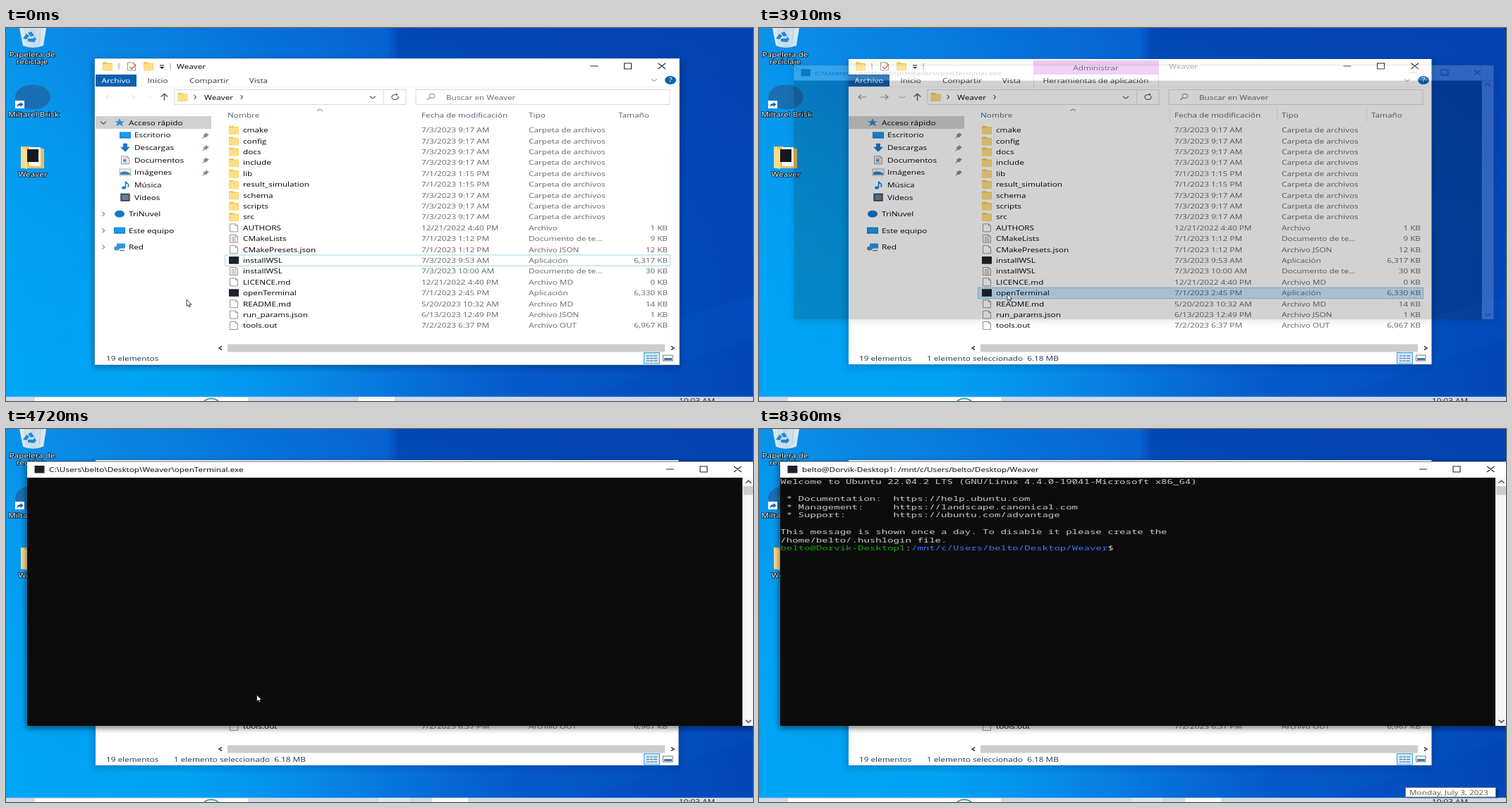
These frames come from a looping animation (1059 by 529 pixels, 8460 ms). An HTML page:

```html
<!DOCTYPE html>
<html lang="es">
<head>
<meta charset="utf-8">
<title>Weaver</title>
<style>
html, body { margin: 0; width: 100%; height: 100%; overflow: hidden; background: #0a6fd8; }
svg { display: block; width: 1059px; height: 529px; }
text { font: 11.15px "Open Sans", "Noto Sans", sans-serif; white-space: pre; }
.mono text { font: 13.33px "Noto Sans Mono", "DejaVu Sans Mono", monospace; fill: #ccc; }
.label text { fill: #fff; text-anchor: middle; stroke: #000b; stroke-width: 2px; paint-order: stroke; }
.line { fill: none; stroke: #333; stroke-width: 1.2; }
</style>
</head>
<body>
<svg id="stage" viewBox="0 0 1059 529"></svg>
<script>
const LOOP = 8460;
const USER = 'belto', HOST = 'Dorvik-Desktop1';
const HOME = `/mnt/c/Users/${USER}/Desktop/Weaver`;

// The desktop is shown squeezed: every text shares this one scale.
const txt = (x, y, s, attrs = '') =>
  `<text transform="translate(${x} ${y}) scale(1.055 .734)" ${attrs}>${s}</text>`;
const mid = 'text-anchor="middle"';
const box = (x, y, w, h, fill, attrs = '') =>
  `<rect x="${x}" y="${y}" width="${w}" height="${h}" fill="${fill}" ${attrs}/>`;
const path = (d, attrs = '') => `<path d="${d}" ${attrs}/>`;
const line = (d, color = '#333', w = 1.2) =>
  path(d, `class="line" style="stroke:${color};stroke-width:${w}"`);
const group = (id, body, attrs = '') => `<g id="${id}" ${attrs}>${body}</g>`;
const ellipse = (x, y, rx, ry, fill, attrs = '') =>
  `<ellipse cx="${x}" cy="${y}" rx="${rx}" ry="${ry}" fill="${fill}" ${attrs}/>`;
const gradient = (id, stops, attrs = '') => `<linearGradient id="${id}" ${attrs}>` +
  stops.map(([o, c]) => `<stop offset="${o}" stop-color="${c}"/>`).join('') + '</linearGradient>';

const folder = (x, y) =>
  path(`M${x} ${y + 1}q0-1 1-1h5l1.5 1.5h5.5q1 0 1 1v8.5q0 1-1 1h-12q-1 0-1-1z`, 'fill="#f3c84f"') +
  box(x + .5, y + 2.5, 13, 9, '#ffdf85');
const app = (x, y) => box(x + 1, y, 14, 10.5, '#1c222b');
const page = (x, y, ruled) =>
  path(`M${x} ${y}h8l3 2.5v8.5h-11z`, 'fill="#fff" stroke="#8a8a8a" stroke-width=".9"') +
  line(`M${x + 8} ${y}v2.5h3`, '#8a8a8a', .8) +
  (ruled ? line(`M${x + 2} ${y + 3}h5m-5 2h7m-7 2h7m-7 2h7`, '#8a8f96', .8) : '');
const winButtons = (x, y, color) =>
  line(`M${x} ${y}h11M${x + 48} ${y - 4}h10v8h-10zM${x + 96} ${y - 4}l10.5 8m0-8l-10.5 8`, color, 1.1);
const chevron = (x, y, dx, dy, color, w) => dx
  ? line(`M${x - dx} ${y - 3}l${dx * 2} 3l${-dx * 2} 3`, color, w)
  : line(`M${x - 4} ${y - dy}l4 ${dy * 2}l4 ${-dy * 2}`, color, w);

const defs = `<defs>
  ${gradient('low', [[0, '#00a6f6'], [.25, '#00a2f4'], [.4, '#068ce9'], [.52, '#0874dd'], [.7, '#0557c8'], [1, '#0347b8']])}
  ${gradient('high', [[0, '#0a92ea'], [.1, '#0a88e4'], [.3, '#0874dc'], [.51, '#0761d0'], [.525, '#0348b4'], [1, '#0342b0']])}
  ${gradient('down', [[0, '#fff'], [.55, '#333'], [.9, '#000']], 'x2="0" y2="1"')}
  ${gradient('bin', [[0, '#f5f8fa'], [.5, '#d3dde5'], [1, '#f0f4f7']])}
  <mask id="fade">${box(0, 0, 1059, 529, 'url(#down)')}</mask>
  <filter id="shadow" x="-5%" y="-10%" width="110%" height="120%"><feGaussianBlur stdDeviation="5"/></filter>
</defs>`;

const wallpaper = box(0, 0, 1059, 529, 'url(#low)') +
  box(0, 0, 1059, 529, 'url(#high)', 'mask="url(#fade)"') +
  path('M560 529L720 478L1059 380V440L800 529z', 'fill="#0a63d2" opacity=".12"');

const desktop = path('M18-6H58L53 25Q38 31 24 25z', 'fill="url(#bin)" opacity=".93"') +
  line('M27 0l2 22M49 0l-2 22', '#b4c2cd', .8) +
  path('M29 16l-5-1l5-7l4 3zM31 7l5-2l4 6l-5 1zM31 19v-4h8l1-3l3 4l-3 4z', 'fill="#2387d6"') +
  ellipse(38, 98, 25, 17.6, '#1a6fb4') +
  box(13, 103, 13, 11, '#fff') + path('M15.5 112q0-5 5-5v-2l4 3.5l-4 3.5v-2q-3-.5-5 2z', 'fill="#1d66b5"') +
  path('M21 168h13l4 3h16v28h-33z', 'fill="#e9bf62"') +
  path('M33 169h16v27H33z', 'fill="#f7f7f7"') +
  box(28, 172, 18, 18, '#15191f') +
  path('M21 168l9 4v28l-9-2z', 'fill="#fbdc92"') +
  `<g class="label">${txt(37, 40.5, 'Papelera de')}${txt(37, 51.3, 'reciclaje')}
   ${txt(39, 126, 'Miltarel Brisk')}${txt(38, 210.5, 'Weaver')}</g>`;

const taskbar = box(0, 523, 1059, 6, '#d0dcea') + box(41, 523.5, 302, 6, '#fff') +
  line('M0 523.3H1059', '#b9cbdc', .7) +
  ellipse(291, 534, 12, 8.5, 'none', 'stroke="#35a3b4" stroke-width="2"') +
  group('taskA', box(500, 523, 51, 6, '#f7fafd')) +
  group('taskB', box(528, 523, 44, 6, '#dfe8f2') + box(604, 523, 51, 6, '#f7fafd')) +
  txt(954, 532, '10:03 AM', 'fill="#222"');

const DIR = 'Carpeta de archivos', TXT = 'Documento de te...';
const files = [
  ['cmake', '7/3/2023 9:17 AM', DIR], ['config', '7/3/2023 9:17 AM', DIR],
  ['docs', '7/3/2023 9:17 AM', DIR], ['include', '7/3/2023 9:17 AM', DIR],
  ['lib', '7/1/2023 1:15 PM', DIR], ['result_simulation', '7/1/2023 1:15 PM', DIR],
  ['schema', '7/3/2023 9:17 AM', DIR], ['scripts', '7/3/2023 9:17 AM', DIR],
  ['src', '7/3/2023 9:17 AM', DIR],
  ['AUTHORS', '12/21/2022 4:40 PM', 'Archivo', '1 KB'],
  ['CMakeLists', '7/1/2023 1:12 PM', TXT, '9 KB'],
  ['CMakePresets.json', '7/1/2023 1:12 PM', 'Archivo JSON', '12 KB'],
  ['installWSL', '7/3/2023 9:53 AM', 'Aplicación', '6,317 KB'],
  ['installWSL', '7/3/2023 10:00 AM', TXT, '30 KB'],
  ['LICENCE.md', '12/21/2022 4:40 PM', 'Archivo MD', '0 KB'],
  ['openTerminal', '7/1/2023 2:45 PM', 'Aplicación', '6,330 KB'],
  ['README.md', '5/20/2023 10:32 AM', 'Archivo MD', '14 KB'],
  ['run_params.json', '6/13/2023 12:49 PM', 'Archivo JSON', '1 KB'],
  ['tools.out', '7/2/2023 6:37 PM', 'Archivo OUT', '6,967 KB']
];
const fileRow = ([name, date, type, size = ''], i) => {
  const y = 144.8 + i * 15.4, b = y + 3.3, grey = 'fill="#666"';
  const icon = type === DIR ? folder(316, y - 6)
    : type === 'Aplicación' ? app(315, y - 5.5) : page(317.5, y - 5.5, type === TXT);
  return icon + txt(336, b, name, 'fill="#000"') + txt(589, b, date, grey) +
    txt(741, b, type, grey) + txt(938, b, size, grey + ' text-anchor="end"');
};

// Icons of the side pane, drawn around their own centre.
const icons = {
  star: path('M0-6l2 4h5l-4 2.5l2 4.5l-5-2.5l-5 2.5l2-4.5l-4-2.5h5z', 'fill="#2a8fdd"'),
  screen: box(-8, -4.5, 16, 9, '#0f7fd0') + box(-7, -3.5, 14, 6, '#1d9bec'),
  down: path('M-3-6h6v5h4l-7 7l-7-7h4z', 'fill="#1f77cf"'),
  doc: page(-5.5, -5.5, true) + box(-3, -1, 4, 3, '#4a94d0'),
  image: box(-8, -5, 16, 9, '#f5f8fa', 'stroke="#8c9aa6" stroke-width=".8"') + path('M-7 3v-3q6-4 14 1v2z', 'fill="#3c7fb8"'),
  note: ellipse(-2, 4, 3, 2, '#1483dd') + line('M.5 4v-9q1 3 4 4q1 2-1 4', '#1483dd', 1.6),
  film: box(-7, -5.5, 14, 11, '#2f3338') + box(-4.5, -4, 9, 8, '#5e83a8') + line('M-6-5v10M6-5v10', '#bbb', .8),
  dot: ellipse(0, 0, 7, 5, '#1277cc'),
  net: box(-4, -5, 12, 7, '#2696e6') + ellipse(-4, 2, 4, 3, '#4b8fc6') + line('M0 5h7', '#4a6a85')
};
const pin = y => path(`M283 ${y - 4}l5 3.5l-1.5 .5l-2 3l-2.500-.3l-4.500 2.800l3-4l-.5-2.500l3.500-1.500z`, 'fill="#84909a"');
const pane = [
  [134.2, 174, 'Acceso rápido', 'star'], [152, 182, 'Escritorio', 'screen', 1],
  [169.7, 182, 'Descargas', 'down', 1], [187.3, 182, 'Documentos', 'doc', 1],
  [205, 182, 'Imágenes', 'image', 1], [222.6, 182, 'Música', 'note'],
  [240.2, 182, 'Vídeos', 'film'], [263.7, 174, 'TriNuvel', 'dot'],
  [287.2, 174, 'Este equipo', 'screen'], [310.6, 174, 'Red', 'net']
];
const paneRow = ([y, x, name, icon, pinned]) =>
  `<g transform="translate(${x === 182 ? 169 : 161} ${y})">${icons[icon]}</g>` +
  txt(x, y + 3.4, name, 'fill="#000"') + (pinned ? pin(y) : '');

const tabs = [[156, 'Archivo', '#fff'], [215, 'Inicio', '#333'], [288, 'Compartir', '#333'], [358, 'Vista', '#333']];
const heads = [[314, 'Nombre'], [589, 'Fecha de modificación'], [741, 'Tipo'], [868, 'Tamaño']];

const explorer =
  group('exShadow', box(124, 46, 833, 435, '#00204a', 'filter="url(#shadow)"')) +
  group('exFrame', box(125.5, 43, 829.5, 435, '#fff', 'stroke="#1e5c9c" stroke-opacity=".6"')) +
  box(127, 44, 826.5, 433, '#fff') +
  folder(137, 48.5) + line('M160 50v9M233 50v9', '#888', .9) +
  page(172.5, 49) + line('M175 55l3 3l6-6', '#c4572e', 1.3) + folder(195, 48.5) +
  line('M218 53h6', '#222') + path('M217.5 55h7l-3.5 3z', 'fill="#222"') +
  group('titleA', txt(242, 58, 'Weaver', 'fill="#000"')) +
  winButtons(828.5, 54, '#222') +
  box(127, 66, 58, 17, '#0a61ae') +
  tabs.map(([x, s, c]) => txt(x, 77.6, s, `${mid} fill="${c}"`)).join('') +
  chevron(919, 74, 0, 1.5, '#888', 1) + ellipse(942, 74, 8, 6, '#0a62b5') +
  txt(942, 77.2, '?', `${mid} fill="#fff" font-weight="700"`) +
  line('M127 83.5H953', '#ececec', .8) +
  group('tools', box(389, 46, 178, 20, '#edc9f3') +
    txt(477.5, 59.6, 'Administrar', `${mid} fill="#5b3a66"`) +
    txt(477.5, 77.6, 'Herramientas de aplicación', `${mid} fill="#333"`) +
    line('M389.5 66v17M566.5 66v17', '#e3d5e6', .9) + txt(581, 58, 'Weaver', 'id="titleB"') +
    line('M582.5 115v18M734.5 115v18M861.5 115v18', '#e2e2e2', .9)) +
  group('arrows', line('M152 98h-11m4-3.5l-4 3.5l4 3.5M172 98h11m-4-3.5l4 3.5l-4 3.5', '#999') +
    chevron(203, 98, 0, 1.2, '#aaa', 1)) +
  line('M224.5 103v-9.5m-5 4l5-4l5 4', '#555', 1.4) +
  box(239, 87.5, 328, 21, 'none', 'stroke="#d9d9d9"') + line('M535.5 88v20', '#e0e0e0', 1) +
  box(581, 87.5, 360, 21, 'none', 'stroke="#d9d9d9"') +
  folder(243.5, 92) + chevron(268, 98, 1.2, 0, '#444') + txt(281, 101.5, 'Weaver', 'fill="#000"') +
  chevron(334, 98, 1.2, 0, '#444') + chevron(520, 98.5, 0, 1.6, '#444') +
  line('M555.5 96.5a4.5 3.5 0 1 1-4-2h4m-2-2v3.5', '#555', 1.2) +
  ellipse(604, 96.5, 4, 3.2, 'none', 'stroke="#888"') + line('M601 99l-4 3', '#888') +
  txt(624, 101.5, 'Buscar en Weaver', 'fill="#666"') +
  heads.map(([x, s]) => txt(x, 126.9, s, 'fill="#4c607a"')).join('') +
  line('M441 117.5l4-2.5l4 2.5', '#777', 1) +
  box(127, 125, 164, 18, '#d0d0d0') + pane.map(paneRow).join('') +
  group('chevrons', chevron(138, 134.5, 0, 1.7, '#555') +
    [263.7, 287.2, 310.6].map(y => chevron(138, y, 1.7, 0, '#888')).join('')) +
  group('focusRow', box(310.5, 322, 631, 15.4, 'none', 'stroke="#a3d4ee"')) +
  group('hoverRow', box(310.5, 368.3, 631, 15.4, '#e5f3ff')) +
  group('pickRow', box(310.5, 368.3, 631, 15.4, '#cce8ff', 'stroke="#8ecbf3"')) +
  files.map(fileRow).join('') +
  box(314, 448.5, 620, 11, '#cdcdcd') +
  line('M306 451.5l-4 2.5l4 2.5M943 451.5l4 2.5l-4 2.5', '#444', 1.5) +
  txt(142, 472.2, '19 elementos', 'fill="#1f3350"') +
  group('picked', txt(238, 472.2, '1 elemento seleccionado  6.18 MB', 'fill="#1f3350"')) +
  box(904.5, 460.5, 22, 15.5, '#cce8ff', 'stroke="#35a2da"') +
  line('M908 465h4m1 0h4m1 0h5M908 468.5h4m1 0h4m1 0h5M908 472h4m1 0h4m1 0h5', '#5b6b78', 1.2) +
  box(931.5, 464, 13.5, 8, '#fff', 'stroke="#777"') + box(933, 468, 11, 3, '#3778ad');

const cell = 8.44, rowH = 11.75;
const put = (col, row, s, attrs = '') => txt(30.3 + col * cell, 78.3 + row * rowH, s, attrs);
const welcome = [
  [0, 'Welcome to Ubuntu 22.04.2 LTS (GNU/Linux 4.4.0-19041-Microsoft x86_64)'],
  [2, ' * Documentation:  https://help.ubuntu.com'],
  [3, ' * Management:     https://landscape.canonical.com'],
  [4, ' * Support:        https://ubuntu.com/advantage'],
  [6, 'This message is shown once a day. To disable it please create the'],
  [7, `/home/${USER}/.hushlogin file.`]
].map(([row, s]) => put(0, row, s)).join('');
const who = `${USER}@${HOST}`;
const prompt = put(0, 8, who, 'style="fill:#16a510"') + put(who.length, 8, ':') +
  put(who.length + 1, 8, HOME, 'style="fill:#3b78ff"') + put(who.length + 1 + HOME.length, 8, '$');

const terminal =
  box(29, 49, 1033, 375, '#000', 'filter="url(#shadow)" opacity=".55"') +
  box(30, 46, 1031.5, 375, '#0c0c0c') + box(30, 46, 1031.5, 23, '#fff') +
  line('M30 46.3H1061', '#555', .7) +
  app(39.5, 52) + txt(61, 61, '', 'id="termTitle" fill="#000"') +
  winButtons(936, 57, '#222') +
  box(1044, 69, 17.5, 352, '#f6f6f6') + group('thumb', box(1045, 81, 15, 12.5, '#cdcdcd')) +
  chevron(1052.5, 75, 0, -1.8, '#444', 1.4) + chevron(1052.5, 414.5, 0, 1.8, '#444', 1.4) +
  `<g class="mono">${group('welcome', welcome)}${group('prompt', prompt)}</g>` +
  group('caretA', box(30, 77, 9.3, 3.6, '#f2f2f2')) +
  group('caretB', box(511.3, 171, 9.2, 3.6, '#f2f2f2'));

const tip = box(919, 511, 129, 13, '#000', 'opacity=".25"') +
  box(916.5, 508.5, 128, 13.5, '#fff', 'stroke="#767676"') +
  txt(922, 518.6, 'Monday, July 3, 2023', 'fill="#575757"');

const pointer = path('M0 0V9.3L2.3 7.5L3.7 10.7L5.2 10.2L3.9 7.1H6.9z',
  'fill="#fff" stroke="#111" stroke-width=".8"') +
  group('busy', ellipse(8.5, .5, 3.6, 3.6, 'none', 'stroke="#8fd0f2" stroke-width="1.6"') +
    line('M8.5-3.1a3.6 3.6 0 0 1 3.6 3.6', '#0d74c8', 1.7));

document.getElementById('stage').innerHTML = defs + wallpaper + desktop + explorer + taskbar +
  group('terminal', terminal) + group('tip', tip) + group('pointer', pointer);

const $ = id => document.getElementById(id);
const show = (id, on) => $(id).setAttribute('opacity', +on);
const between = (t, a, b) => t >= a && t < b;
const ramp = (t, a, b) => Math.min(1, Math.max(0, (t - a) / (b - a)));

// Pointer path: time, x, y
const route = [
  [0, 256, 385], [1069, 256, 385], [1070, 261, 385.5], [1220, 261, 385.5], [1450, 288, 383],
  [1680, 334, 379], [1890, 352, 377], [4719, 352, 377], [4720, 355.5, 377], [4940, 356, 377],
  [5300, 424, 379], [5680, 488, 371], [5980, 488, 371], [6320, 498.5, 367], [6500, 520, 371],
  [6820, 683, 407], [7150, 1007, 531], [LOOP, 1007, 531]
];
function pointerAt(t) {
  const i = route.findIndex(p => p[0] > t);
  const [t0, x0, y0] = route[i - 1], [t1, x1, y1] = route[i];
  const k = (t - t0) / (t1 - t0);
  return [x0 + (x1 - x0) * k, y0 + (y1 - y0) * k];
}

// Opening of the terminal: start, opacity, scale
const opening = [[0, 0, 1], [3910, .18, .962], [3950, .5, .9744], [4140, .96, .998], [4290, 1, 1]];
const PICK = 1960, OPEN = 3910, SETTLE = 4140, WELCOME = 6640, READY = 7000;

function draw(t) {
  const picked = t >= PICK, open = t >= OPEN, settled = t >= SETTLE, ready = t >= READY;
  for (const id of ['tools', 'pickRow', 'picked']) show(id, picked);
  show('arrows', picked ? 1 : .22);
  show('titleA', !picked);
  show('focusRow', !picked);
  show('hoverRow', ramp(t, 1870, 1990));
  show('chevrons', 1 - ramp(t, 1600, 2200));
  show('exShadow', open ? .25 : .45);
  show('exFrame', !open);
  $('titleB').setAttribute('fill', open ? '#999' : '#000');
  show('taskA', !open);
  show('taskB', settled);

  const [, alpha, size] = opening.filter(s => s[0] <= t).pop();
  show('terminal', alpha);
  $('terminal').setAttribute('transform', `translate(540 215) scale(${size}) translate(-540 -215)`);
  show('thumb', settled);
  const title = ready ? `${who}: ${HOME}` : `C:\\Users\\${USER}\\Desktop\\Weaver\\openTerminal.exe`;
  if ($('termTitle').textContent !== title) $('termTitle').textContent = title;
  show('welcome', t >= WELCOME);
  show('prompt', ready);
  show('caretA', between(t, 4290, 4440) || between(t, 4940, 5370) || between(t, 5840, 6360));
  show('caretB', between(t, READY, 8360));
  show('tip', t < 7890 ? 0 : t < 8030 ? .4 : .55 + .45 * ramp(t, 8030, 8090));

  const [x, y] = pointerAt(t);
  $('pointer').setAttribute('transform', `translate(${x} ${y})`);
  show('busy', between(t, 2090, OPEN));
  $('busy').setAttribute('transform', `rotate(${Math.floor(t / 43) * 20} 8.5 .5)`);
}

const start = performance.now();
function tick() {
  draw((performance.now() - start) % LOOP);
  requestAnimationFrame(tick);
}
tick();
</script>
</body>
</html>
```
